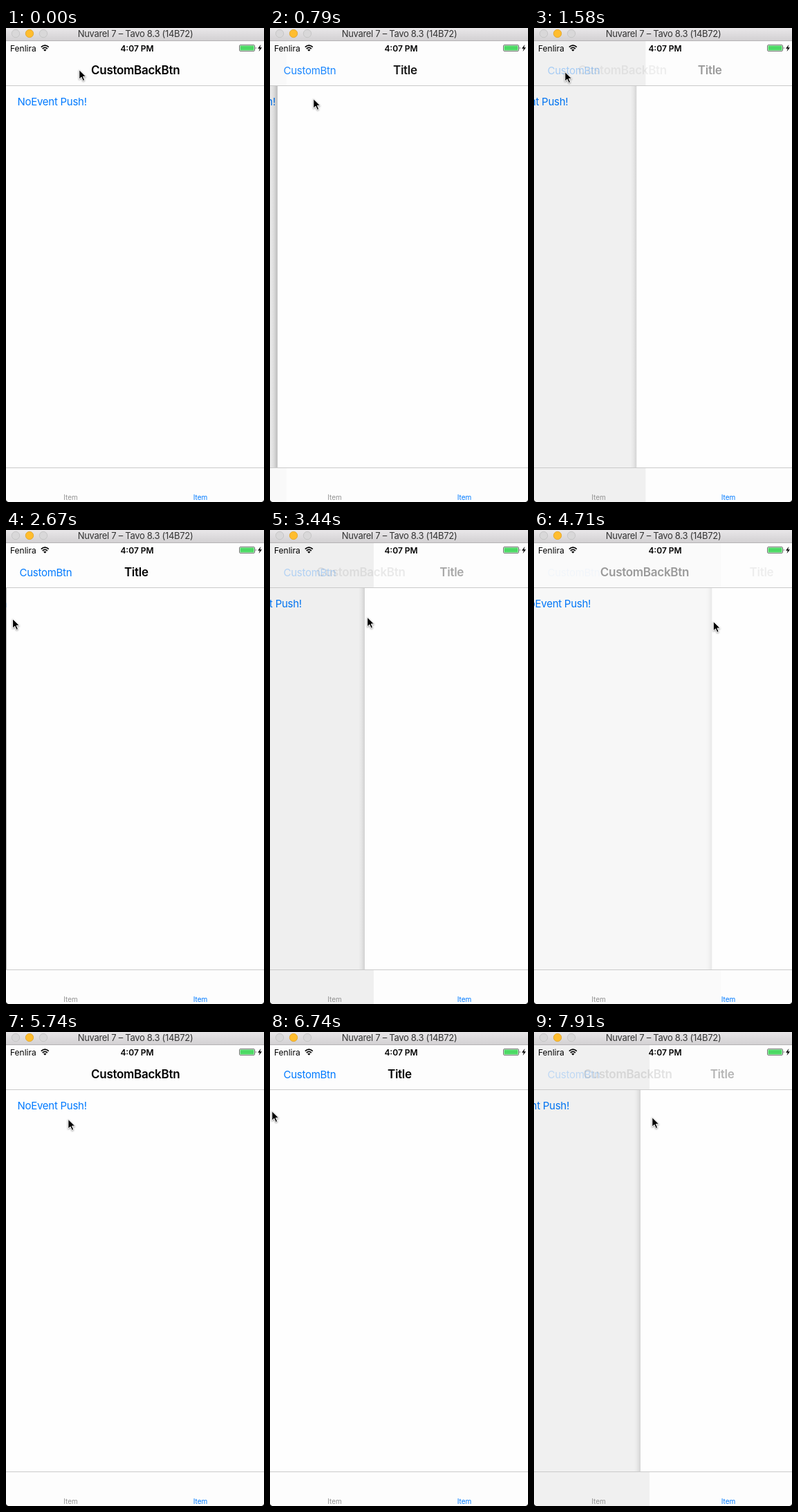
These frames come from a looping animation (373 by 686 pixels, 8000 ms). An HTML page:

```html
<!DOCTYPE html>
<html lang="en">
<head>
<meta charset="utf-8">
<title>Custom back button</title>
<style>
  html, body { margin: 0; width: 100%; height: 100%; overflow: hidden; background: #fefefe; }
  svg { display: block; width: 373px; height: 686px; }
  text { font-family: Inter, Roboto, sans-serif; fill: #000; }
  .link { font-size: 15px; letter-spacing: -.27px; fill: #007aff; }
  .title { font-size: 17px; font-weight: 600; letter-spacing: -.28px; }
  .status { font-size: 12px; }
  .tab { font-size: 10px; text-anchor: middle; }
</style>
</head>
<body>
<svg viewBox="0 0 373 686">
  <defs>
    <linearGradient id="chrome" x2="0" y2="1">
      <stop stop-color="#e9e7e9"/><stop offset="1" stop-color="#d2d0d2"/>
    </linearGradient>
    <linearGradient id="soft">
      <stop stop-opacity="0"/><stop offset=".45" stop-opacity=".3"/><stop offset="1"/>
    </linearGradient>
    <clipPath id="content"><rect y="84" width="373" height="552"/></clipPath>
  </defs>

  <rect width="373" height="686" fill="#fefefe"/>
  <g clip-path="url(#content)">
    <text id="push" class="link" x="16.5" y="112">NoEvent Push!</text>
    <rect id="dim" y="84" height="552"/>
    <g id="page">
      <rect id="shadow" x="-9" y="84" width="9" height="552" fill="url(#soft)"/>
      <rect y="84" width="373" height="552" fill="#fefefe"/>
    </g>
  </g>

  <rect y="19" width="373" height="64" fill="#fdfdfd"/>
  <rect y="637" width="373" height="49" fill="#fdfdfd"/>
  <g id="tint">
    <rect class="bar" y="19" height="64"/>
    <rect class="bar" y="637" height="49"/>
  </g>
  <path d="M0 83.5H373M0 636.5H373" stroke="#cacaca"/>

  <text id="back" class="link" x="19.5" y="67">CustomBtn</text>
  <text id="rootTitle" class="title" x="123" y="67">CustomBackBtn</text>
  <text id="pageTitle" class="title" x="170" y="67">Title</text>

  <text class="status" x="6" y="33.5">Fenlira</text>
  <g fill="none" stroke="#000" stroke-width="1.7">
    <path d="M50.8 27.6Q56.3 22.6 61.8 27.6M52.8 30Q56.3 26.8 59.8 30"/>
    <path d="M56.3 33.8L54.1 31.5Q56.3 29.8 58.5 31.5Z" fill="#000" stroke="none"/>
  </g>
  <text class="status" x="189.5" y="33.5" font-weight="600" text-anchor="middle">4:07 PM</text>
  <rect x="337.5" y="24.5" width="22" height="9" rx="1.5" fill="#fff" stroke="#555" stroke-width=".8"/>
  <rect x="338.5" y="25.5" width="20" height="7" rx=".6" fill="#4cd964"/>
  <path d="M360.8 27.3Q362.6 29 360.8 30.7Z" fill="#333"/>
  <path d="M368.4 24L364 29.8H366.8L365.6 34L370 28.3H367.2Z"/>

  <text class="tab" x="93.5" y="682.5" style="fill:#929292">Item</text>
  <text class="tab" x="281" y="682.5" style="fill:#007aff">Item</text>

  <rect width="373" height="18.5" fill="url(#chrome)"/>
  <path d="M0 18.5H373" stroke="#b5b3b5"/>
  <g fill="#d9d8d9" stroke="#c1c0c1" stroke-width=".8">
    <circle cx="14" cy="8" r="5.7"/>
    <circle cx="34" cy="8" r="5.7" fill="#ffbd2e" stroke="#e0a123"/>
    <circle cx="54" cy="8" r="5.7"/>
  </g>
  <text x="187" y="13" text-anchor="middle" font-size="13" letter-spacing="-.3" style="fill:#333">Nuvarel 7 – Tavo 8.3 (14B72)</text>
  <path d="M0 682.5Q.5 685.5 3.5 686H0ZM373 682.5Q372.5 685.5 369.5 686H373Z"/>

  <path id="cursor" d="M.8 .5V14.2L4 11.2L6.3 16.5L8.7 15.4L6.4 10.3H10.7Z" stroke="#fff" style="filter:drop-shadow(0 1px 1px #0006)"/>
</svg>
<script>
const LOOP = 8000, W = 373, SLIDE = 560, TITLE_LAG = 17;
const $ = id => document.getElementById(id);
const bars = document.querySelectorAll('.bar');

const smooth = u => u * u * (3 - 2 * u);
const easeOut = u => 1 - (1 - u) ** 3.25;

// Each track is a list of eased moves towards a new value
const edge = [], handX = [], handY = [];
const slide = (at, to) => edge.push({ at, dur: SLIDE, to, ease: easeOut, lag: TITLE_LAG });
const pushPage = at => slide(at, 0);
const popPage = at => slide(at, W);
function point(at, dur, x, y) {
  handX.push({ at, dur, to: x, ease: smooth });
  handY.push({ at, dur, to: y, ease: smooth });
}
function drag(at, dur, to, x, y) {
  edge.push({ at, dur, to, ease: smooth });
  point(at, dur, x, y);
}

// Open the page, then leave it with the custom button
point(60, 210, 62, 102);
pushPage(420);
point(850, 430, 44, 63);
popPage(1500);
point(1640, 420, 50, 98);

// Open it again and swipe back from the screen edge
pushPage(2180);
point(2240, 400, 8, 128);
drag(2620, 1500, 240, 239, 124);
drag(4150, 620, 258, 259, 132);
popPage(4800);

// Wander off, open it once more and start another swipe
point(5260, 190, 293, 305);
point(5450, 370, 62, 102);
pushPage(6070);
point(6280, 460, 2, 114);
drag(7040, 510, 203, 219, 122);
drag(7720, 190, 154, 170, 123);

function valueAt(track, from, t, lagged = false) {
  return track.reduce((v, { at, dur, to, ease, lag = 0 }) => {
    const u = (t - at - (lagged ? lag : 0)) / dur;
    return v + (to - v) * ease(Math.min(1, Math.max(0, u)));
  }, from);
}

const shift = (id, x, y = 0) => $(id).setAttribute('transform', `translate(${x} ${y})`);
const fade = (id, alpha) => $(id).setAttribute('opacity', alpha);

function draw(t) {
  const x = valueAt(edge, W, t), p = x / W, rest = 1 - p;
  // Titles trail the page slightly when a tap drives the transition
  const n = valueAt(edge, W, t, true) / W;

  shift('push', -112 * rest);
  $('dim').setAttribute('width', x);
  fade('dim', .093 * rest);
  shift('page', x);
  fade('shadow', x > .3 ? .2 * rest : 0);

  bars.forEach(b => b.setAttribute('width', Math.min(W, x + 13)));
  fade('tint', .6 * p * rest ** 3);

  shift('rootTitle', -88 * (1 - n));
  shift('pageTitle', 205 * n);
  fade('rootTitle', n ** 2.6);
  fade('pageTitle', (1 - n) ** 2.4);
  fade('back', (1 - n) ** 3);

  shift('cursor', valueAt(handX, 105, t), valueAt(handY, 60, t));
}

const start = performance.now();
function tick(now) {
  draw(Math.max(0, now - start) % LOOP);
  requestAnimationFrame(tick);
}
draw(0);
requestAnimationFrame(tick);
</script>
</body>
</html>
```
